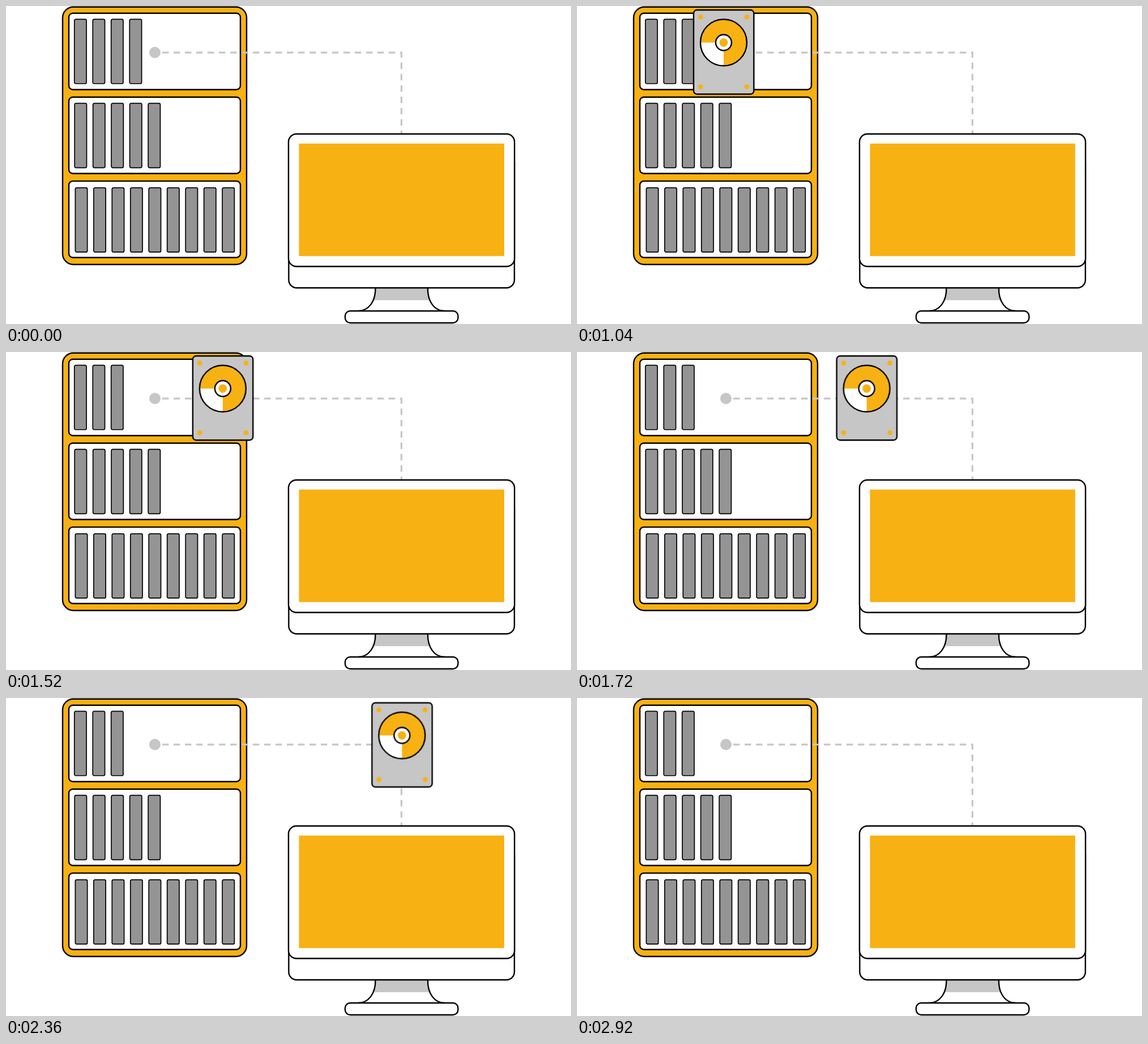
Write an HTML page without scripts that moves like this. It is 998 by 561 pixels and loops after 3000 ms.

```html
<!DOCTYPE html>
<html lang="en">
<head>
<meta charset="utf-8">
<title>Drive moving from rack to computer</title>
<style>
  html, body { margin: 0; width: 100%; height: 100%; overflow: hidden; background: #fff; }
  svg { display: block; width: 100%; height: 100%; }

  .line { stroke: #000; stroke-width: 2.4; }
  .white { fill: #fff; }
  .gold { fill: #f8b112; }
  .silver { fill: #c6c6c6; }
  .bar { fill: #949494; stroke: #000; stroke-width: 1.7; }
  .cable { fill: none; stroke: #c6c6c6; stroke-width: 3.2; stroke-dasharray: 11.5 8.5; }

  .stored, .tilted, .flat { animation: 3s step-end infinite; }
  .stored { animation-name: stored; }
  .tilted { animation-name: tilted; }
  .flat { animation-name: flat; }
  .drive { animation: travel 3s linear infinite; }

  @keyframes stored { 0% { visibility: visible; } 22.667%, 100% { visibility: hidden; } }
  @keyframes tilted {
    0% { visibility: hidden; }
    22.667% { visibility: visible; }
    34.667%, 100% { visibility: hidden; }
  }
  @keyframes flat {
    0% { visibility: hidden; }
    34.667% { visibility: visible; }
    97.333%, 100% { visibility: hidden; }
  }
  /* slide along the cable, then drop behind the monitor */
  @keyframes travel {
    0% { transform: translate(206px, 7px); }
    38.27% { transform: translate(206px, 7px); animation-timing-function: cubic-bezier(.364, 0, .63, 1); }
    73.333% { transform: translate(646.4px, 7px); }
    77.467% { transform: translate(646.4px, 7px); animation-timing-function: cubic-bezier(.37, 0, .66, .733); }
    97.333%, 100% { transform: translate(646.4px, 226px); }
  }
</style>
</head>
<body>
<svg viewBox="0 0 998 561" preserveAspectRatio="none">
  <defs>
    <rect id="bar" class="bar" width="21.3" height="113.6" rx="2.5"/>
    <rect id="shelf" class="white line" x="111" width="303" height="134.8" rx="7"/>
    <g id="three">
      <use href="#bar"/>
      <use href="#bar" x="32.45"/>
      <use href="#bar" x="64.9"/>
    </g>
    <clipPath id="neck">
      <path d="M652.5 497C653 522 640 538 622 538H775C757 538 744.500 522 745 497Z"/>
    </clipPath>
  </defs>

  <!-- rack -->
  <rect class="gold line" x="100" y="1.700" width="325" height="454.300" rx="19"/>
  <use href="#shelf" y="12.700"/>
  <use href="#shelf" y="160.700"/>
  <use href="#shelf" y="308.900"/>
  <use href="#three" x="120.800" y="23.400"/>
  <use class="stored" href="#bar" x="218.300" y="23.400"/>
  <use href="#three" x="121.200" y="171.700"/>
  <use href="#bar" x="218.600" y="171.700"/>
  <use href="#bar" x="251.200" y="171.700"/>
  <use href="#three" x="122.400" y="320.600"/>
  <use href="#three" x="219.800" y="320.600"/>
  <use href="#three" x="317.200" y="320.600"/>

  <!-- cable -->
  <path class="cable" d="M276 82.200H698.500V226"/>
  <circle class="silver" cx="263" cy="82" r="10"/>

  <!-- drive pulled half out -->
  <g class="tilted">
    <path class="silver line" d="M224 20.700L311 9.900Q315.500 9.500 315.500 14V151Q315.500 156.500 310.500 155.500L224 139Q219.500 138 219.500 134V26Q219.500 21.300 224 20.700Z"/>
    <circle class="gold" cx="264.500" cy="66.500" r="36.700"/>
    <path class="white" d="M261.500 66.700H227.800A36.700 36.700 0 0 0 261.500 103Z"/>
    <circle class="line" fill="none" cx="264.500" cy="66.500" r="36.700"/>
    <circle class="white line" cx="261.500" cy="67" r="12.700"/>
    <circle class="gold" cx="261.500" cy="67" r="6.500"/>
    <g class="gold">
      <circle cx="228" cy="30.500" r="3.700"/>
      <circle cx="301.500" cy="23" r="4.700"/>
      <circle cx="228" cy="129" r="3.700"/>
      <circle cx="301.500" cy="142" r="4.700"/>
    </g>
  </g>

  <!-- drive facing front -->
  <g class="flat">
    <g class="drive">
      <rect class="silver line" width="106.400" height="148.500" rx="6"/>
      <circle class="gold" cx="53" cy="57.500" r="41"/>
      <path class="white" d="M53 57.500H12A41 41 0 0 0 53 98.500Z"/>
      <circle class="line" fill="none" cx="53" cy="57.500" r="41"/>
      <circle class="white line" cx="53" cy="57.500" r="14"/>
      <circle class="gold" cx="53" cy="57.500" r="7.500"/>
      <g class="gold">
        <circle cx="12.200" cy="12.500" r="4.400"/>
        <circle cx="94" cy="12.500" r="4.400"/>
        <circle cx="12.200" cy="135.500" r="4.400"/>
        <circle cx="94" cy="135.500" r="4.400"/>
      </g>
    </g>
  </g>

  <!-- computer -->
  <rect class="silver" x="620" y="497" width="156" height="22" clip-path="url(#neck)"/>
  <path class="line" fill="none" d="M652.500 497C653 522 640 538 622 538M775 538C757 538 744.500 522 745 497"/>
  <rect class="white line" x="599" y="538" width="199.500" height="21" rx="9"/>
  <rect class="white line" x="499.400" y="262" width="398.600" height="235.300" rx="14"/>
  <rect class="white line" x="499" y="225.700" width="399.200" height="233.800" rx="14"/>
  <rect class="gold" x="517.500" y="242.700" width="362.500" height="198.500"/>
</svg>
</body>
</html>
```
